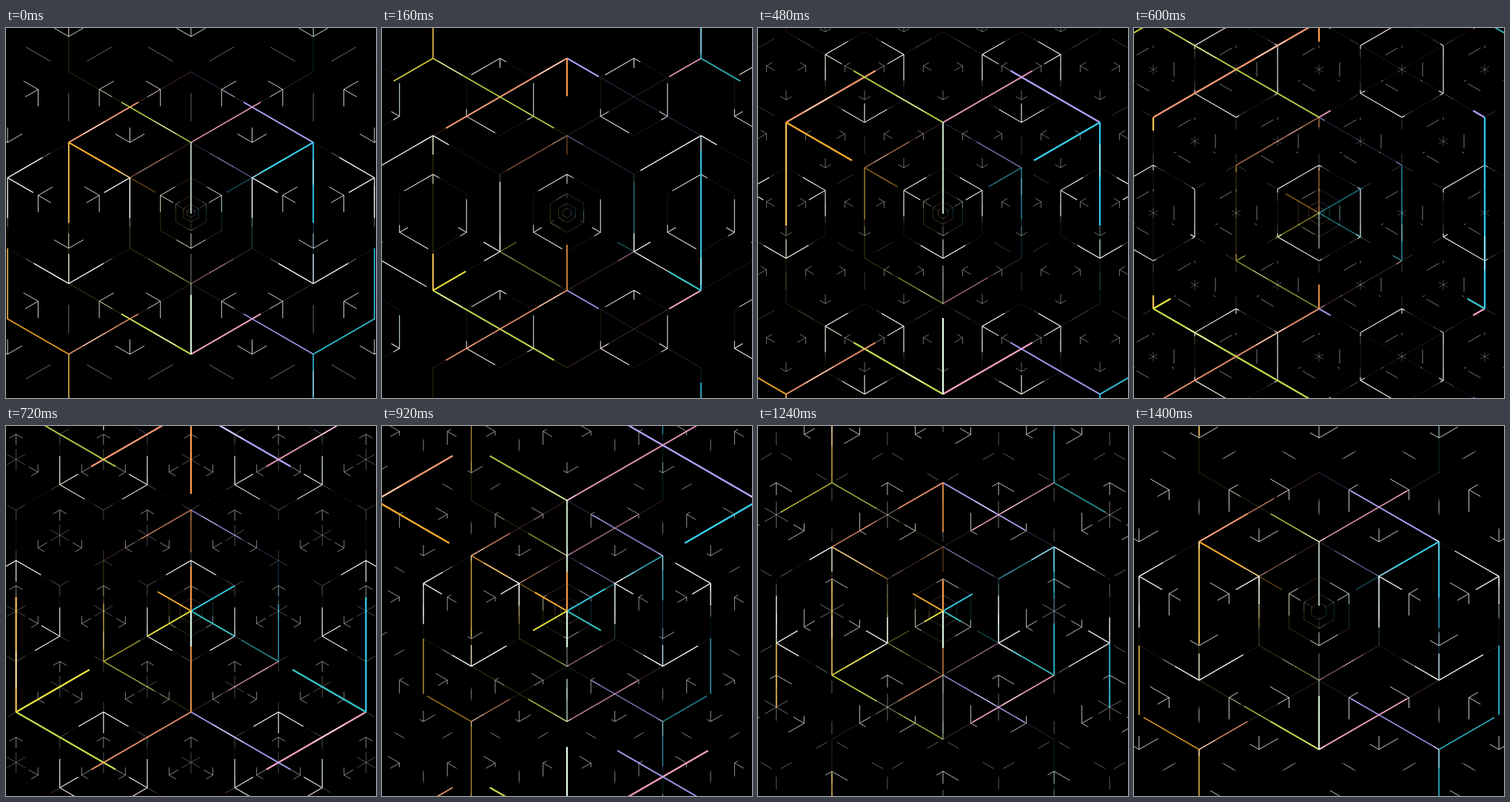
Write an HTML page with a canvas that moves like this. It is 500 px wide and 500 px high and loops after 1.44 s.

```html
<!DOCTYPE html>
<html>
<head>
<meta charset="utf-8">
<style>
html, body { margin: 0; width: 100%; height: 100%; overflow: hidden; background: #000; }
canvas { display: block; width: 500px; height: 500px; }
</style>
</head>
<body>
<canvas id="stage" width="500" height="500"></canvas>
<script>
const ctx = document.getElementById('stage').getContext('2d');
const LOOP = 1440, STEP = 40, BASE = 95.4;
const H = Math.sqrt(3) / 2;
const WHITE = '#fff';

// Both palettes run clockwise from the top corner.
const EDGES = ['#afa4ff', '#35c8ea', '#f5a0c4', '#c3d94a', '#efc052', '#f79a72'];
const SPOKES = ['#ff9c4a', '#35d3ee', '#35c9cc', '#e4ffe8', '#e9e33c', '#ffae28'];

const mod = (a, n) => ((a % n) + n) % n;
const clamp = v => Math.max(0, Math.min(1, v));
const mix = (a, b, k) => a + (b - a) * k;

// Piecewise linear curve through [position, value] pairs.
function curve(stops, x) {
  if (x <= stops[0][0]) return stops[0][1];
  for (let i = 1; i < stops.length; i++) {
    const [x0, y0] = stops[i - 1], [x1, y1] = stops[i];
    if (x <= x1) return mix(y0, y1, (x - x0) / (x1 - x0));
  }
  return stops[stops.length - 1][1];
}

const ALPHA = [[20, .12], [28, .35], [36, .55], [47, .8], [56, 1], [69, 1], [77, .4],
  [96, .45], [136, .65], [165, .85], [190, 1], [300, 1], [345, 0]];
const WIDTH = [[50, 1], [100, 1.2], [190, 1.9], [245, 2.3]];
const HALF = [[28, .28], [40, .33], [47, .47], [57, .57]];

function line(x0, y0, x1, y1, color, alpha, width) {
  if (alpha <= 0.01) return;
  ctx.strokeStyle = color;
  ctx.globalAlpha = alpha;
  ctx.lineWidth = width;
  ctx.beginPath();
  ctx.moveTo(x0, y0);
  ctx.lineTo(x1, y1);
  ctx.stroke();
}

function corner(i, r) {
  const a = mod(i, 6) * Math.PI / 3;
  return [Math.sin(a) * r, -Math.cos(a) * r];
}

function along(s, r) {
  const i = Math.floor(s), k = s - i;
  const a = corner(i, r), b = corner(i + 1, r);
  return [mix(a[0], b[0], k), mix(a[1], b[1], k)];
}

// Part of a hexagon outline; whole numbers are corners.
function trace(x, y, r, from, to, alpha, width, color) {
  while (from < to - 1e-6) {
    const edge = Math.floor(from + 1e-6);
    const end = Math.min(edge + 1, to);
    const a = along(from, r), b = along(end, r);
    line(x + a[0], y + a[1], x + b[0], y + b[1], color || EDGES[mod(edge, 6)], alpha, width);
    from = end;
  }
}

function spoke(x, y, i, r0, r1, alpha, width, color) {
  const a = corner(i, r0), b = corner(i, r1);
  line(x + a[0], y + a[1], x + b[0], y + b[1], color || SPOKES[mod(i, 6)], alpha, width);
}

// Three dashes running clockwise, with a spoke at each corner they round.
function runners(x, y, r, c, alpha, width, color, outward) {
  const half = curve(HALF, r);
  const near = Math.round(c);
  const reach = .42 * clamp(1.25 - 2 * Math.abs(c - near));
  for (let i = 0; i < 6; i += 2) {
    trace(x, y, r, c + i - half, c + i + half, alpha, width, color);
    if (reach) {
      spoke(x, y, near + i, r, r * (outward ? 1 + reach * 1.2 : 1 - reach), alpha, width, color);
    }
    if (r > 70) trace(x, y, r, c + i + .12, c + i + .3, alpha * .8, 1, WHITE);
  }
}

// Centres of a honeycomb whose cells have the given radius.
function eachCell(radius, draw) {
  const rows = Math.ceil(300 / (1.5 * radius)), cols = Math.ceil(300 / (H * radius));
  for (let n = -rows; n <= rows; n++) {
    for (let m = -cols; m <= cols; m++) {
      if (mod(m + n, 2) === 0) draw(m * H * radius, n * 1.5 * radius);
    }
  }
}

function smallLevel(r, c) {
  const alpha = curve(ALPHA, r), width = curve(WIDTH, r);
  const star = .42 * clamp(1.5 - 2 * Math.abs(mod(c + 1, 2) - 1));
  eachCell(2 * r, (x, y) => {
    const middle = x === 0 && y === 0;
    if (r < 27 && !middle) return;
    runners(x, y, r, c, alpha, width, WHITE);
    if (r > 50 || r < 27) return;
    if (star) for (let i = 0; i < 6; i++) spoke(x, y, i, 0, r * star, alpha * .6, 1, WHITE);
    const stub = mod(c, 2) / 2;
    for (let i = 0; i < 6; i++) {
      trace(x, y, 2 * r, i + stub, i + stub + .2, alpha * .5, 1, WHITE);
    }
  });
  if (r < 50) trace(0, 0, r, 0, 6, .22, 1);
  else eachCell(2 * r, (x, y) => trace(x, y, r, 0, 6, .12, 1));
}

function largeLevel(r, c, u) {
  const alpha = curve(ALPHA, r), width = curve(WIDTH, r);
  const faint = .3 * clamp((300 - r) / 90);
  trace(0, 0, r, 0, 6, faint, 1);
  runners(0, 0, r, c, alpha, width);

  if (r < 105) {
    for (const side of [-1, 1]) {
      const x = side * 2 * H * r;
      trace(x, 0, r, 0, 6, .12, 1);
      runners(x, 0, r, c, .9 * clamp((r - 66) / 6), 1.4, WHITE);
    }
  }
  if (r > 140) {
    for (const side of [-1, 1]) {
      trace(0, side * 1.5 * r, r, 0, 6, faint * .7, 1);
      runners(0, side * 1.5 * r, r, c, alpha * .9, width * .85, null, true);
    }
  }
  // Leading strokes and long spokes that announce the next corners.
  if (r > 150 && r < 192) {
    const grow = clamp((u - .66) / .34) * .68;
    for (let i = 1; i < 6; i += 2) {
      trace(0, 0, r, i, i + grow, .8, 1.4);
      spoke(0, 0, i, r * .5, r, .6, 1.4);
    }
  }
}

// Upright bars at the left and right of the stage.
function sideBars(r, u) {
  const alpha = u > .6 ? clamp((u - .58) * 12) : clamp(1 - u * 7);
  const x = 3 * H * r;
  line(-x, r / 2, -x, r * 1.5, EDGES[4], alpha * .9, 1.8);
  line(x, r / 2, x, r * 1.5, EDGES[1], alpha * .9, 1.8);
}

function burst(u) {
  const alpha = clamp((u - .36) * 8) * clamp((.96 - u) * 12);
  const early = [60, 68, 68, 48, 68, 52], late = [42, 46, 29, 50, 29, 47];
  const k = clamp((u - .5) / .36);
  for (let i = 0; i < 6; i++) {
    spoke(0, 0, i, 0, mix(early[i], late[i], k), alpha, 2);
  }
}

function draw(now) {
  const u = Math.floor(mod(now, LOOP) / STEP) * STEP / LOOP;
  const zoom = u + .267 * u * (1 - u) ** 3;
  const c = 6 * u + 1;

  ctx.setTransform(1, 0, 0, 1, 0, 0);
  ctx.globalAlpha = 1;
  ctx.fillStyle = '#000';
  ctx.fillRect(0, 0, 500, 500);
  ctx.translate(250, 250);

  for (let n = -4; n <= 1; n++) {
    const r = BASE * 2 ** (n + zoom);
    if (r < 71) smallLevel(r, c);
    else if (r < 350) largeLevel(r, c, u);
  }
  sideBars(BASE * 2 ** (u > .5 ? zoom - 1 : zoom), u);
  burst(u);
}

const start = performance.now();
function tick() {
  draw(performance.now() - start);
  requestAnimationFrame(tick);
}
tick();
</script>
</body>
</html>
```
